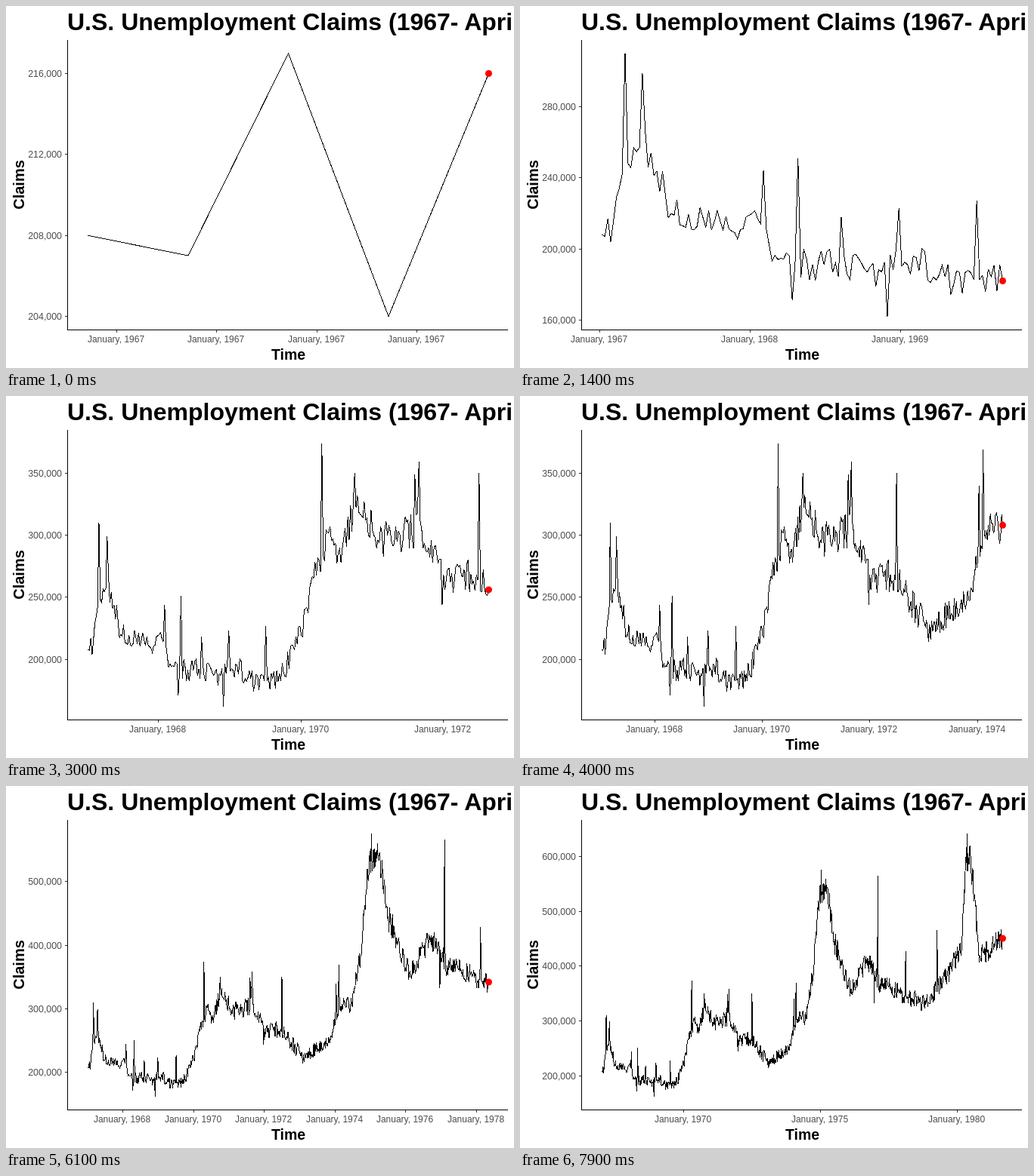
Write an HTML page that moves like this. It is 672x480 px and loops after 8 s.

```html
<!DOCTYPE html>
<html lang="en">
<head>
<meta charset="utf-8">
<title>Claims over time</title>
<style>
  html, body { margin: 0; width: 100%; height: 100%; overflow: hidden; background: #fff; }
  svg { display: block; font-family: "Liberation Sans", Arial, sans-serif; }
  .title { font-weight: bold; fill: #000; }
  .tick { stroke: #333; shape-rendering: crispEdges; }
  .label { font-size: 12px; fill: #4d4d4d; }
  .value { font-size: 12.4px; text-anchor: end; }
  .date { text-anchor: middle; }
  .line { fill: none; stroke: #000; shape-rendering: crispEdges; }
</style>
</head>
<body>
<svg width="672" height="480" viewBox="0 0 672 480">
  <text class="title" x="81" y="32" font-size="32">U.S. Unemployment Claims (1967- April 2020)</text>
  <text class="title" x="373.5" y="469" font-size="19.5" text-anchor="middle">Time</text>
  <text class="title" transform="translate(24 237) rotate(-90)" font-size="20" text-anchor="middle">Claims</text>
  <g id="ticks"></g>
  <path id="series" class="line"/>
  <path class="line" d="M81.5 45V429.5H664"/>
  <circle id="head" r="4.5" fill="#f00"/>
</svg>
<script>
const FRAME_MS = 100, FRAMES = 80, WEEKS_PER_FRAME = 9.612, NOISE = 0.05;
const DAY = 864e5, START = Date.UTC(1967, 0, 7);
const LEFT = 108.5, RIGHT = 638.5, TOP = 62.7, BOTTOM = 411.6;

// [week, thousands of claims]: the slow course, and weeks that stand out from it.
const course = [
  [0, 208], [1, 207], [2, 217], [3, 204], [4, 216], [7, 242], [13, 257], [17, 254],
  [24, 220], [45, 210], [54, 217], [61, 194], [97, 187], [108, 196], [122, 180], [139, 182],
  [153, 212], [169, 280], [176, 302], [185, 278], [197, 332], [212, 296], [244, 305],
  [262, 265], [284, 268], [293, 256], [316, 224], [356, 248], [370, 305], [389, 308],
  [404, 400], [412, 520], [430, 545], [443, 445], [474, 355], [504, 412], [530, 368],
  [617, 330], [668, 398], [686, 440], [694, 600], [703, 595], [720, 415], [764, 451]];
const standouts = new Map([
  [8, 310], [14, 299], [56, 244], [66, 171], [68, 251], [83, 218], [99, 162], [103, 223],
  [130, 227], [171, 374], [195, 350], [239, 349], [242, 359], [259, 244], [286, 350],
  [366, 340], [370, 369], [418, 576], [519, 332], [526, 566], [579, 428], [639, 466], [696, 643]]);

function randomFrom(seed) {
  return () => (seed = seed * 16807 % 2147483647) / 2147483647;
}

const random = randomFrom(1967);

function claims(week) {
  const noise = NOISE * (random() * 2 - 1);
  if (standouts.has(week)) return standouts.get(week);
  const i = course.findIndex(([w]) => w >= week);
  const [w1, v1] = course[i];
  if (week === w1) return v1;
  const [w0, v0] = course[i - 1];
  return (v0 + (v1 - v0) * (week - w0) / (w1 - w0)) * (1 + noise);
}

const lastWeek = frame => Math.floor((frame + 0.5) * WEEKS_PER_FRAME);
const series = Array.from({ length: lastWeek(FRAMES - 1) + 1 }, (_, w) => claims(w));

// Extended Wilkinson labelling: weighs simplicity, coverage and density.
function valueBreaks(lo, hi) {
  const nice = [1, 5, 2, 2.5, 4, 3], target = 5, span = hi - lo;
  let best = -Infinity, result = [];
  nice.forEach((q, rank) => {
    for (let k = 2; k <= 10; k++) for (let z = -1; z <= 2; z++) {
      const step = q * 10 ** z;
      const last = Math.ceil(lo / step);
      for (let s = Math.floor(hi / step) - k + 1; s <= last; s++) {
        const a = s * step, b = a + step * (k - 1);
        const simplicity = -rank / (nice.length - 1) + (a <= 0 && b >= 0 ? 1 : 0);
        const coverage = 1 - 0.5 * ((hi - b) ** 2 + (lo - a) ** 2) / (0.1 * span) ** 2;
        const ratio = (Math.max(b, hi) - Math.min(a, lo)) / step / (target - 1);
        const density = 2 - Math.max(ratio, 1 / ratio);
        const score = 0.25 * simplicity + 0.2 * coverage + 0.5 * density;
        if (score > best + 1e-9) {
          best = score;
          result = Array.from({ length: k }, (_, i) => a + i * step);
        }
      }
    }
  });
  return result.filter(v => v >= lo && v <= hi);
}

const months = n => ({ days: n * 30.44, at: i => (Date.UTC(1960, i * n, 1) - START) / DAY });
const calendar = [{ days: 7, at: i => i * 7 - 5 }, ...[1, 3, 6, 12, 24, 60].map(months)];

function cover(unit, lo, hi) {
  let i = 0;
  while (unit.at(i + 1) <= lo) i++;
  const days = [unit.at(i)];
  while (days[days.length - 1] < hi) days.push(unit.at(++i));
  return days;
}

// Picks the calendar step that gives closest to five intervals.
function dateBreaks(lo, hi) {
  const miss = days => Math.abs(days.length - 6);
  const guess = calendar.map(u => Math.abs((hi - lo) / u.days - 5));
  const index = guess.indexOf(Math.min(...guess));
  let days = cover(calendar[index], lo, hi);
  const next = calendar[index + Math.sign(days.length - 6)];
  if (next) {
    const other = cover(next, lo, hi);
    if (miss(other) < miss(days)) days = other;
  }
  return days.filter(d => d >= lo && d <= hi);
}

function dateLabel(day) {
  const date = new Date(START + day * DAY);
  const month = date.toLocaleString("en-US", { month: "long", timeZone: "UTC" });
  return `${month}, ${date.getUTCFullYear()}`;
}

const snap = v => Math.floor(v) + 0.5;

function build(frame) {
  const week = lastWeek(frame), days = week * 7;
  const shown = series.slice(0, week + 1);
  const min = Math.min(...shown), max = Math.max(...shown), pad = (max - min) * 0.05;
  const x = day => LEFT + (RIGHT - LEFT) * day / days;
  const y = value => BOTTOM - (BOTTOM - TOP) * (value - min) / (max - min);

  const rows = valueBreaks(min - pad, max + pad).map(v => {
    const py = snap(y(v)), text = Math.round(v * 1000).toLocaleString("en-US");
    return `<path class="tick" d="M78 ${py}H81"/>` +
      `<text class="label value" x="74" y="${py + 4.5}">${text}</text>`;
  });
  const columns = dateBreaks(-days * 0.05, days * 1.05).map(d => {
    const px = snap(x(d));
    return `<path class="tick" d="M${px} 430V433"/>` +
      `<text class="label date" x="${px - 1}" y="446">${dateLabel(d)}</text>`;
  });
  return {
    ticks: rows.concat(columns).join(""),
    path: "M" + shown.map((v, w) => `${x(w * 7).toFixed(2)} ${y(v).toFixed(2)}`).join("L"),
    headY: y(shown[week])
  };
}

const ticks = document.getElementById("ticks");
const line = document.getElementById("series");
const head = document.getElementById("head");
head.setAttribute("cx", RIGHT);

const scenes = Array.from({ length: FRAMES }, (_, i) => build(i));
let current = -1;

function draw(time) {
  const frame = Math.floor(time / FRAME_MS) % FRAMES;
  if (frame === current) return;
  current = frame;
  const scene = scenes[frame];
  ticks.innerHTML = scene.ticks;
  line.setAttribute("d", scene.path);
  head.setAttribute("cy", scene.headY);
}

const begin = performance.now();
function loop() {
  draw(performance.now() - begin);
  requestAnimationFrame(loop);
}
loop();
</script>
</body>
</html>
```
